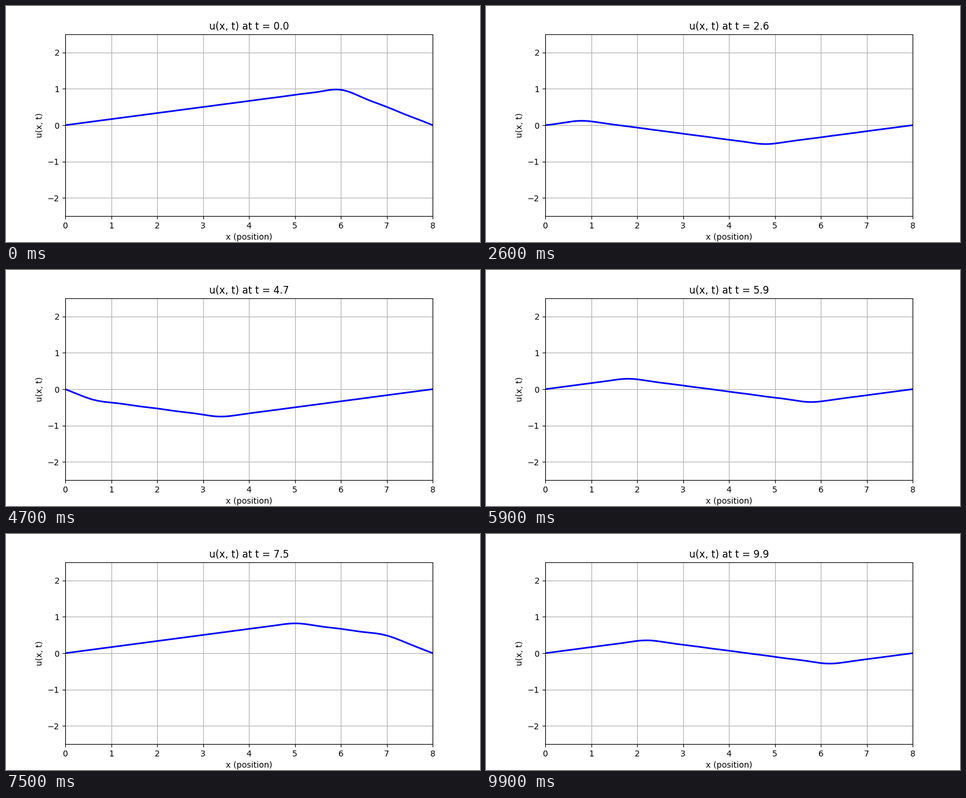
A matplotlib script that plays this animation: 800x400 px, repeating every 10000 ms.

```python
import numpy as np
import matplotlib.pyplot as plt
from matplotlib.animation import FuncAnimation

# Plucked string: fixed ends, unit peak at x = A, Fourier series solution
L = 8.0
A = 6.0
C = 2.0
TERMS = 20
FRAMES = 100
DT = 0.1

n = np.arange(1, TERMS + 1)
k = n * np.pi / L
coef = 2 * L**2 / (A * (L - A) * (n * np.pi) ** 2) * np.sin(k * A)

x = np.linspace(0, L, 500)
modes = np.sin(np.outer(x, k))


def u(t):
    return modes @ (coef * np.cos(k * C * t))


fig, ax = plt.subplots(figsize=(8, 4), dpi=100)
line, = ax.plot(x, u(0), color="blue", lw=2)
ax.set_xlim(0, L)
ax.set_ylim(-2.5, 2.5)
ax.set_xlabel("x (position)")
ax.set_ylabel("u(x, t)")
ax.grid(True)
title = ax.set_title("u(x, t) at t = 0.0")


def update(i):
    t = i * DT
    line.set_ydata(u(t))
    title.set_text(f"u(x, t) at t = {t:.1f}")
    return line, title


anim = FuncAnimation(fig, update, frames=FRAMES, interval=100,
                     repeat=True, repeat_delay=0, blit=False)
plt.show()
```
